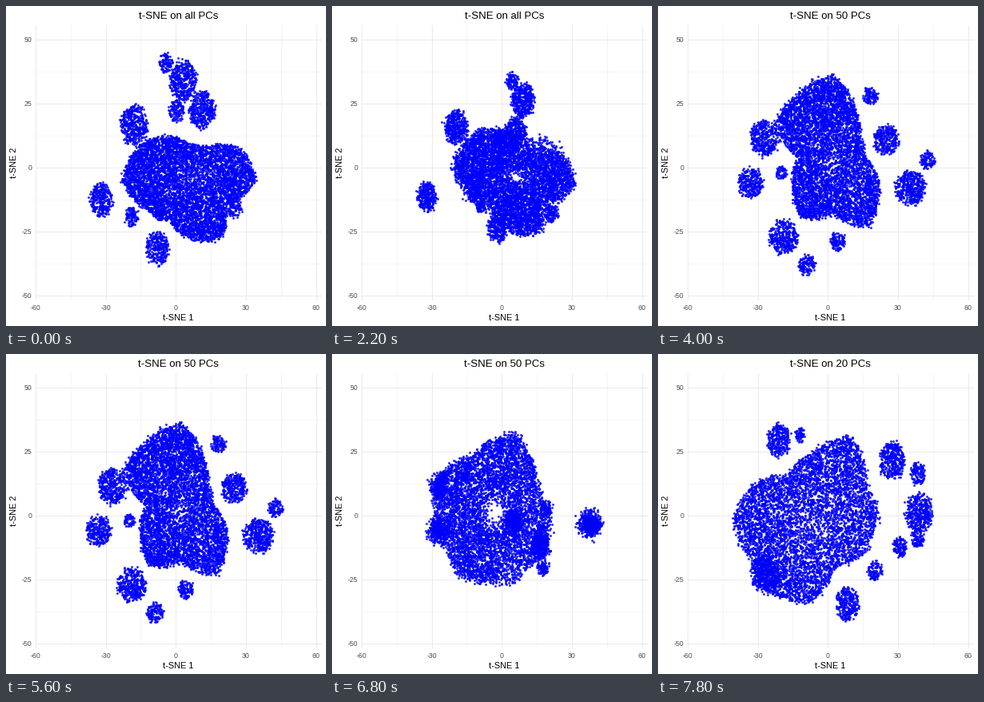
Recreate the animation shown at these times as a matplotlib script. Size 400 by 400 pixels, loop 8 s.

```python
import numpy as np
import matplotlib.pyplot as plt
from matplotlib.animation import FuncAnimation

SIZE, DPI = 400, 100
PT = 72 / DPI  # points per pixel
FRAMES, STEP_MS = 40, 200
MOVE = 14      # frames per transition
STARTS = (6, 27)
BODY_CELLS = 6200
ISLAND_DENSITY = 10

plt.rcParams["font.family"] = "Liberation Sans"

# Per embedding: title, body centre, body radius every 30 degrees,
# turn of the body cells, height / width of the islands.
EMBEDDINGS = [
    ("t-SNE on all PCs", 6 - 5j,
     [28, 25, 15, 14, 20, 26, 29, 22, 18, 23, 26, 18], 0, 1.35),
    ("t-SNE on 50 PCs", 2 + 4j,
     [14, 14, 20, 32, 29, 28, 15, 20, 27, 22, 31, 23], -0.17, 1.1),
    ("t-SNE on 20 PCs", -8 - 1j,
     [29, 28, 37, 25, 19, 27, 33, 30, 34, 33, 22, 27], -0.12, 1.3),
]

# Separate islands: centre in each embedding, mean radius.
ISLANDS = [
    (-4.5 + 41j, 42.5 + 3j, 38 - 9j, 3.2),
    (3 + 34j, 35 - 8j, 39 + 1j, 6.5),
    (11 + 22.5j, -19 - 27j, 28 + 22j, 6.2),
    (22j, -9 - 38j, 39 + 17j, 3.7),
    (-18 + 17j, -27 + 12j, -27 - 23j, 6.5),
    (-32 - 12.5j, -33 - 6j, -21 + 30j, 5.5),
    (-8 - 31.5j, 25 + 11j, 8 - 35j, 5.5),
    (-19 - 19j, 18 + 28j, 20 - 22j, 3.3),
    (-7 - 18j, -20 - 2j, -12 + 32j, 2.5),
    (25 - 15.5j, 4 - 29j, 31 - 12j, 3.4),
]

rng = np.random.default_rng(8)


def fill_body(centre, radii, turn, q, v):
    """Fill the outline evenly; q runs around it, v from centre to rim."""
    n = len(q)
    angle = np.linspace(0, 2 * np.pi, 361)
    rim = np.interp(angle, np.linspace(0, 2 * np.pi, 13), radii + radii[:1])
    area = np.cumsum(rim**2)
    q = (q + turn + rng.normal(0, 0.05, n)) % 1
    v = 1 - abs(1 - abs(v + rng.normal(0, 0.15, n)))
    theta = np.interp(q, area / area[-1], angle)
    rho = abs(v)**0.45 + rng.normal(0, 0.02, n)
    return centre + rho * np.interp(theta, angle, rim) * np.exp(1j * theta)


def fill_island(centre, radius, tall):
    """Scatter a soft-edged ellipse."""
    n = int(ISLAND_DENSITY * radius**2)
    disc = np.sqrt(rng.uniform(0, 1, n)) * np.exp(2j * np.pi * rng.random(n))
    disc += rng.normal(0, 0.09, n) + 1j * rng.normal(0, 0.09, n)
    disc = disc.real / np.sqrt(tall) + 1j * disc.imag * np.sqrt(tall)
    return centre + radius * disc


def build_states():
    q, v = rng.random((2, BODY_CELLS))
    states = []
    for k, (_, centre, radii, turn, tall) in enumerate(EMBEDDINGS):
        parts = [fill_body(centre, radii, turn, q, v)]
        parts += [fill_island(isle[k], isle[-1], tall) for isle in ISLANDS]
        states.append(np.concatenate(parts))
    return states


def ease(t):
    return 4 * t**3 if t < 0.5 else 1 - 4 * (1 - t)**3


states = build_states()

fig = plt.figure(figsize=(SIZE / DPI, SIZE / DPI), dpi=DPI, facecolor="white")

X0, X_UNIT, Y0, Y_UNIT = 212.3, 2.925, 201.8, 3.195
LEFT, RIGHT, TOP, BOTTOM = 36.5, 394.5, 24, 367.5

ax = fig.add_axes([LEFT / SIZE, 1 - BOTTOM / SIZE,
                   (RIGHT - LEFT) / SIZE, (BOTTOM - TOP) / SIZE])
ax.set_xlim((LEFT - X0) / X_UNIT, (RIGHT - X0) / X_UNIT)
ax.set_ylim((Y0 - BOTTOM) / Y_UNIT, (Y0 - TOP) / Y_UNIT)
ax.axis("off")


def label(x, y, text, px, color="black", **kw):
    return fig.text(x / SIZE, 1 - y / SIZE, text, fontsize=px * PT,
                    color=color, **kw)


def grid(xs, ys, px):
    style = dict(color="#EBEBEB", lw=px * PT, zorder=0)
    for x in xs:
        ax.axvline(x, **style)
    for y in ys:
        ax.axhline(y, **style)


x_ticks, y_ticks = range(-60, 61, 30), range(-50, 51, 25)
grid(range(-45, 46, 30), np.arange(-37.5, 38, 25), 0.53)
grid(x_ticks, y_ticks, 1.07)

for x in x_ticks:
    label(X0 + x * X_UNIT, 380, str(x), 8.8, "#4D4D4D", ha="center")
for y in y_ticks:
    label(32, Y0 - y * Y_UNIT + 3.2, str(y), 8.8, "#4D4D4D", ha="right")
label(215.5, 393, "t-SNE 1", 11, ha="center")
label(15, 196, "t-SNE 2", 11, rotation=90, ha="right", va="center")
title = label(215.5, 16.5, EMBEDDINGS[0][0], 13.2, ha="center")

dots, = ax.plot([], [], "o", color="blue", ms=2.9 * PT, mew=0, alpha=0.85)


def draw(i):
    leg = int(i > STARTS[1])
    t = min(max((i - STARTS[leg]) / MOVE, 0), 1)
    k = ease(t)
    cells = (1 - k) * states[leg] + k * states[leg + 1]
    dots.set_data(cells.real, cells.imag)
    title.set_text(EMBEDDINGS[leg + (t > 0.5)][0])
    return dots, title


anim = FuncAnimation(fig, draw, frames=FRAMES, interval=STEP_MS,
                     repeat=True, repeat_delay=0)
plt.show()
```
